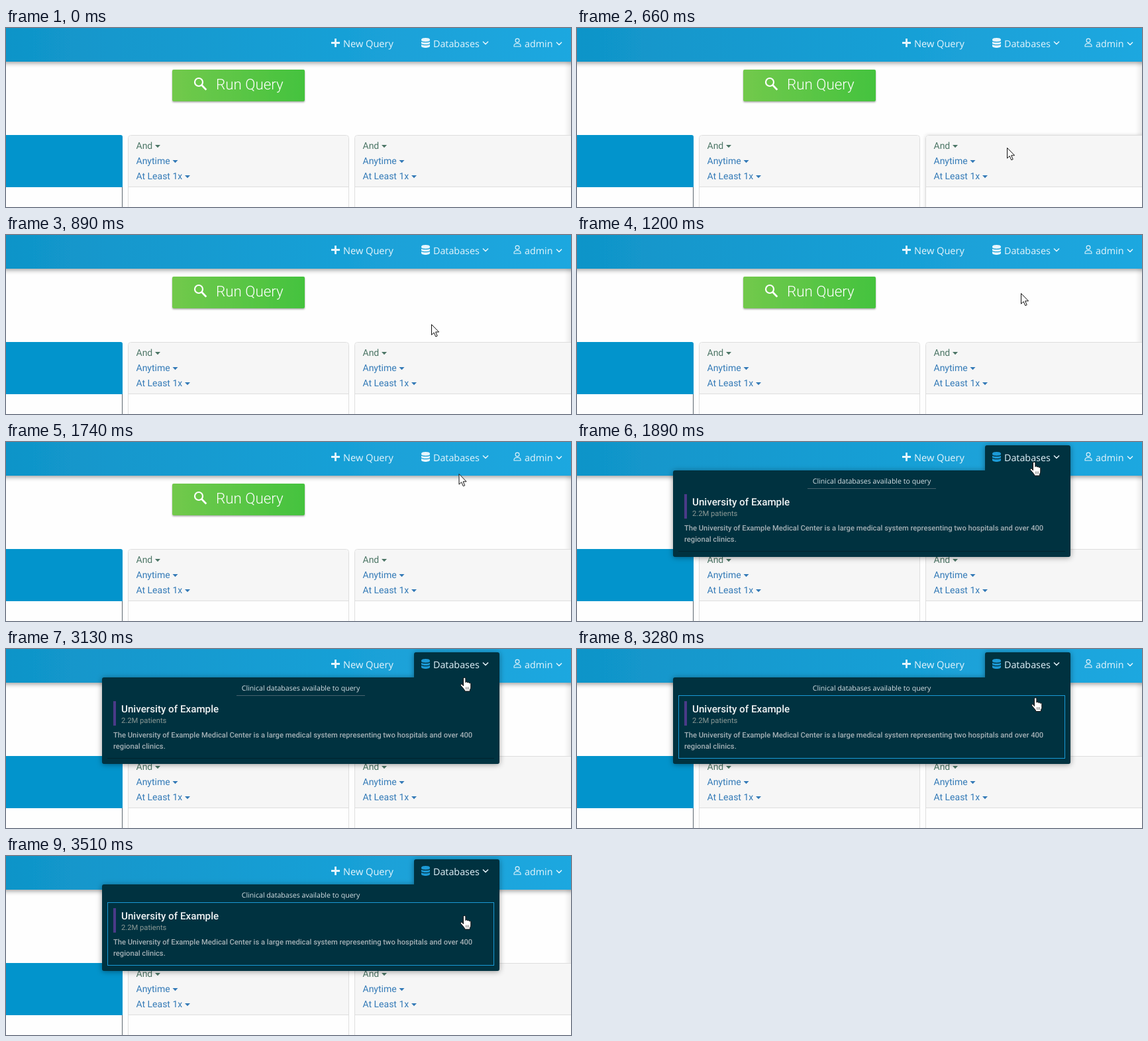
Write an HTML page that moves like this. It is 853 px wide and 271 px high and loops after 8000 ms.

```html
<!DOCTYPE html>
<html lang="en">
<head>
<meta charset="utf-8">
<title>Query builder</title>
<style>
  html, body { margin: 0; width: 100%; height: 100%; overflow: hidden; background: #fefefe; }
  svg { display: block; width: 853px; height: 271px; }
  text { font-family: Roboto, sans-serif; text-rendering: geometricPrecision; white-space: pre; }
  .nav text, .heading { font-family: "Open Sans", "Noto Sans", sans-serif; }
  .nav text { font-size: 14.3px; fill: #e6f5fc; }
  .line { fill: none; stroke: #e6f5fc; }
  .card text { font-size: 14px; }
</style>
</head>
<body>
<svg viewBox="0 0 853 271">
  <defs>
    <linearGradient id="bar"><stop stop-color="#1094c8"/><stop offset="1" stop-color="#1fa8e0"/></linearGradient>
    <linearGradient id="green"><stop stop-color="#72c94c"/><stop offset="1" stop-color="#44c33e"/></linearGradient>
    <linearGradient id="edge"><stop stop-color="#000" stop-opacity="0"/><stop offset="1" stop-color="#000" stop-opacity=".08"/></linearGradient>
    <filter id="barShadow" x="-5%" y="-20%" width="110%" height="160%"><feDropShadow dx="0" dy="2" stdDeviation="3.5" flood-opacity=".4"/></filter>
    <filter id="buttonShadow" x="-5%" y="-20%" width="110%" height="150%"><feDropShadow dx="0" dy="1.5" stdDeviation="1.2" flood-opacity=".35"/></filter>
    <filter id="menuShadow" x="-5%" y="-10%" width="110%" height="130%"><feDropShadow dx="0" dy="1" stdDeviation="4" flood-opacity=".4"/></filter>
    <filter id="hoverShadow" x="-5%" y="-10%" width="110%" height="120%"><feDropShadow dx="0" dy="0" stdDeviation="2.5" flood-opacity=".14"/></filter>
  </defs>

  <rect x="843" y="51" width="10" height="220" fill="url(#edge)"/>

  <path d="M0 162H173a3 3 0 0 1 3 3V241H0z" fill="#0294cc"/>
  <path d="M175.5 241V271" stroke="#5c6670"/>
  <rect id="cardHover" x="526" y="162" width="345" height="130" rx="4" fill="#fff" filter="url(#hoverShadow)"/>
  <g id="cards"></g>

  <rect x="-20" width="893" height="51" fill="url(#bar)" filter="url(#barShadow)"/>

  <rect x="251" y="63" width="200" height="48" rx="2" fill="url(#green)" filter="url(#buttonShadow)"/>
  <g fill="none" stroke="#fff">
    <circle cx="291" cy="82" r="6" stroke-width="2.2"/>
    <path d="M295.5 86.5L302.3 93.6" stroke-width="2.8"/>
  </g>
  <text x="317" y="93" font-size="22.4" font-weight="300" fill="#fff">Run Query</text>

  <g id="menu">
    <g filter="url(#menuShadow)" fill="#023041">
      <path d="M616 46V8a3 3 0 0 1 3-3H742a3 3 0 0 1 3 3V46z"/>
      <rect x="145" y="43" width="600" height="131" rx="3"/>
    </g>
    <text class="heading" x="445" y="63" text-anchor="middle" font-size="10.6" fill="#d8e1e5">Clinical databases available to query</text>
    <path d="M348 70.5H542" stroke="#48626d"/>
    <path d="M153 165.5H737" stroke="#02232f"/>
    <rect x="162" y="79" width="4" height="37" fill="#4b3a88"/>
    <text x="174" y="96" font-size="15.2" font-weight="500" fill="#f0f3f4">University of Example</text>
    <text x="174" y="112" font-size="11.2" fill="#8d9a96">2.2M patients</text>
    <g font-size="11.2" font-weight="500" fill="#a5b1b6">
      <text x="162" y="134">The University of Example Medical Center is a large medical system representing two hospitals and over 400</text>
      <text x="162" y="151">regional clinics.</text>
    </g>
    <rect id="highlight" x="153.5" y="70.5" width="583" height="95" fill="none" stroke="#1a9ad6"/>
  </g>

  <g class="nav">
    <path class="line" d="M491 22.5H504M497.5 16V29" stroke-width="2.8"/>
    <text x="509" y="29" style="font-size:14.6px">New Query</text>
    <g id="disks">
      <path d="M627 17.5c0-3.3 13-3.3 13 0v1c0 3-13 3-13 0z"/>
      <path d="M627 20.7c2 1.8 11 1.8 13 0v2.2c0 2.9-13 2.9-13 0z"/>
      <path d="M627 25c2 1.8 11 1.8 13 0v2.5c0 3.3-13 3.3-13 0z"/>
    </g>
    <text x="645" y="29">Databases</text>
    <path class="line" d="M720 20.5l4 4 4-4M831 21.5l4 4 4-4" stroke-width="1.5"/>
    <g class="line" stroke-width="1.1">
      <circle cx="772" cy="19" r="2.9"/>
      <path d="M767 28v-1.2c0-4.4 10-4.4 10 0V28z"/>
    </g>
    <text x="783" y="29">admin</text>
  </g>

  <path id="arrow" d="M.5.5V16.2l3.6-3.4 2.7 6 2.4-1-2.6-5.9h5z" fill="#fff" stroke="#111"/>
  <g id="hand" stroke-linejoin="round">
    <path d="M5.5 13.5V2.4a1.7 1.7 0 0 1 3.4 0V8c.3-1.2 3-1 3 .6.4-1 2.6-.8 2.7.8.4-.9 2.2-.6 2.2 1V15.5c0 2-1.4 3-1.4 4.4v1.6H7.6v-1.4C6 17.6 3.4 14.9 1.8 13c-1.2-1.6.6-3.1 2.1-1.8z" fill="#fff" stroke="#111"/>
    <path d="M9.5 15v4M11.5 15v4M13.5 15v4" stroke="#555" stroke-width=".7"/>
  </g>
</svg>
<script>
const LOOP = 8000, START = 340, STEP = 77.3;
const MENU_STEP = 19, HIGHLIGHT_STEP = 38;
const byId = id => document.getElementById(id);

// Pointer path: [step, x, y]
const arrowPath = [[0, 731, 257], [2, 690, 221], [4, 649, 181], [6, 636, 150],
  [8, 648, 120], [10, 666, 98], [11, 670, 88], [14, 676, 70], [18, 683.5, 48]];
const handPath = [[19, 680.5, 32.5], [20, 683, 29.5], [35, 683, 29.5], [36, 685, 42.5],
  [37, 685, 59], [38, 685, 73], [39, 685, 83], [40, 685, 83], [41, 685, 89.5]];

function option(x, y, label, caretX, color) {
  return `<g fill="${color}"><text x="${x + 12.5}" y="${y}">${label}</text>
    <path d="M${x + caretX} ${y - 6}h8l-4 4.2z"/></g>`;
}

function card(x, width) {
  return `<g class="card">
    <rect x="${x + .5}" y="162.5" width="${width - 1}" height="130" rx="4" fill="#fefefe" stroke="#dedede"/>
    <path d="M${x + 1} 240V167a4 4 0 0 1 4-4H${x + width - 5}a4 4 0 0 1 4 4V240z" fill="#f6f6f6"/>
    <path d="M${x} 240.5H${x + width}" stroke="#dedede"/>
    ${option(x, 183, "And", 41, "#4b7565")}
    ${option(x, 206, "Anytime", 67.5, "#337ab7")}
    ${option(x, 229, "At Least 1x", 86, "#337ab7")}
  </g>`;
}

byId("cards").innerHTML = card(184, 334) + card(526, 345);

function pointAt(path, step) {
  const next = path.findIndex(key => key[0] >= step);
  if (next < 0) return path.at(-1).slice(1);
  if (next === 0) return path[0].slice(1);
  const [s0, x0, y0] = path[next - 1], [s1, x1, y1] = path[next];
  const k = (step - s0) / (s1 - s0);
  return [x0 + (x1 - x0) * k, y0 + (y1 - y0) * k];
}

function show(id, visible) {
  byId(id).style.display = visible ? "" : "none";
}

function draw(time) {
  const step = Math.floor((time % LOOP - START) / STEP);
  const menuOpen = step >= MENU_STEP;
  const [x, y] = pointAt(menuOpen ? handPath : arrowPath, step);
  byId(menuOpen ? "hand" : "arrow").setAttribute("transform", `translate(${x} ${y})`);
  show("arrow", step >= 0 && !menuOpen);
  show("hand", menuOpen);
  show("menu", menuOpen);
  show("highlight", step >= HIGHLIGHT_STEP);
  show("cardHover", step >= 0 && !menuOpen && y > 162);
  byId("disks").setAttribute("fill", menuOpen ? "#1c9ad6" : "#e6f5fc");
}

const origin = performance.now();
function tick() {
  draw(performance.now() - origin);
  requestAnimationFrame(tick);
}
tick();
</script>
</body>
</html>
```
